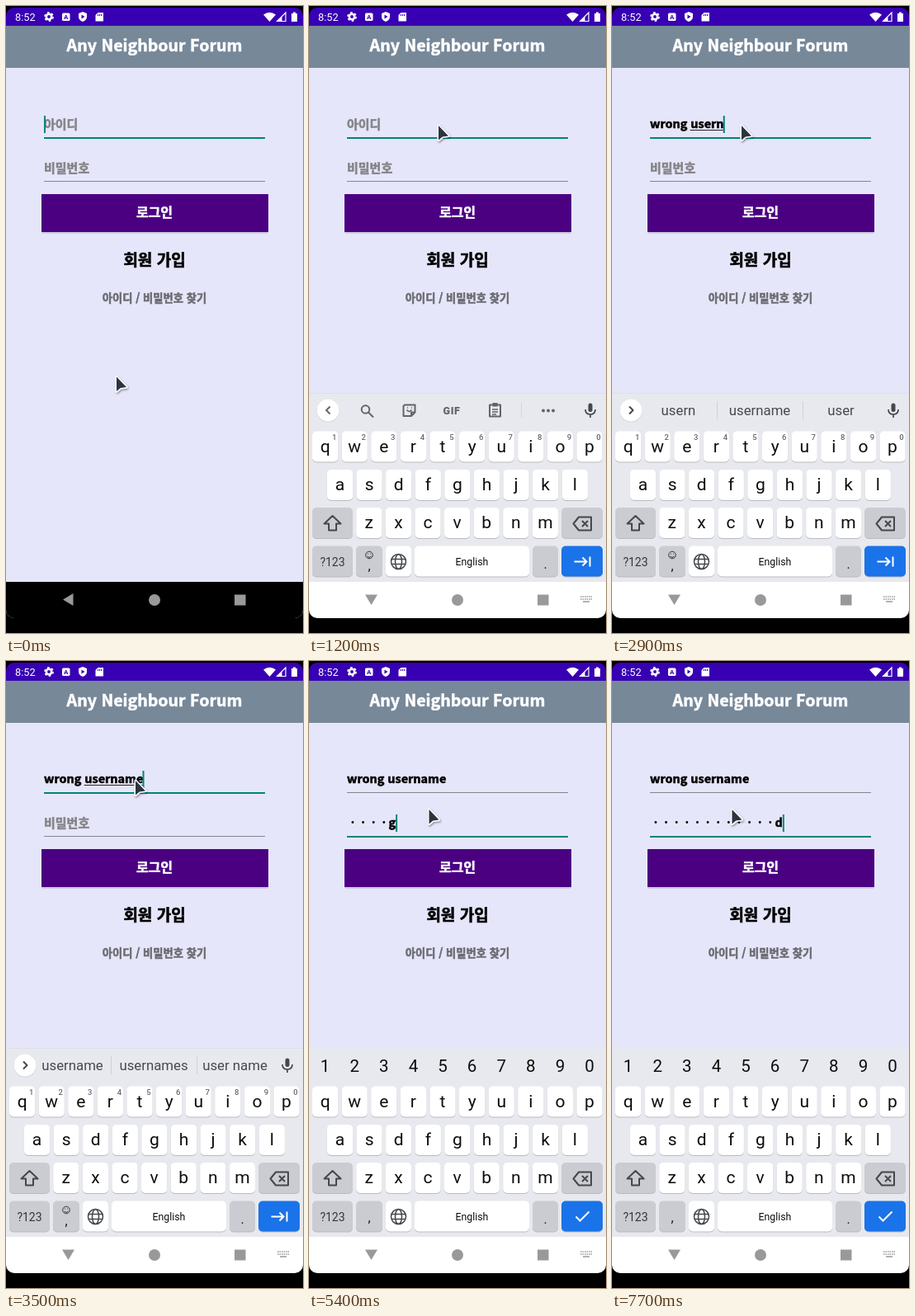
Write an HTML page that moves like this. It is 360 px wide and 760 px high and loops after 8 s.

```html
<!DOCTYPE html>
<html lang="ko">
<head>
<meta charset="utf-8">
<title>Login screen</title>
<style>
html,body{margin:0;width:100%;height:100%;overflow:hidden;background:#000}
svg{display:block;width:360px;height:760px}
.kr{font-family:"Noto Sans CJK KR","Noto Sans CJK",sans-serif;font-weight:900;stroke-width:.55}
.rb{font-family:Roboto,sans-serif}
.mid{text-anchor:middle}
.line{fill:none;stroke:#44474c;stroke-width:2;stroke-linejoin:round}
</style>
</head>
<body>
<svg id="stage" viewBox="0 0 360 760"></svg>
<script>
const LOOP = 8000, STEP = 100;
const FONT = '900 14.4px "Noto Sans CJK KR","Noto Sans CJK",sans-serif';
const stage = document.getElementById('stage');
const $ = id => document.getElementById(id);

const rect = (x, y, w, h, fill, more = '') =>
  `<rect x="${x}" y="${y}" width="${w}" height="${h}" fill="${fill}" ${more}/>`;
const text = (x, y, size, str, fill, cls, more = '') =>
  `<text x="${x}" y="${y}" font-size="${size}" fill="${fill}" class="${cls}" ${more}>${str}</text>`;
const bold = (x, y, size, str, fill, cls = '', more = '') =>
  text(x, y, size, str, fill, 'kr ' + cls, `stroke="${fill}" ${more}`);
const path = (d, more = 'class="line"') => `<path d="${d}" ${more}/>`;
const circle = (x, y, r, more) => `<circle cx="${x}" cy="${y}" r="${r}" ${more}/>`;

function key(x, y, w, fill) {
  return rect(x, y + 1, w, 37, '#b9bbc1', 'rx="5"') + rect(x, y, w, 37, fill, 'rx="5"');
}

function letterRow(str, x0, y) {
  return [...str].map((c, i) => {
    const x = x0 + 35.6 * i;
    return key(x - 15.6, y, 31.2, '#fff') + text(x, y + 25, 21, c, '#0c0d0e', 'rb mid');
  }).join('');
}

function statusBar() {
  const w = 'fill="#fff"';
  return rect(0, 0, 360, 24, '#3700b3') +
    text(11, 18, 12.8, '8:52', '#fff', 'rb') +
    circle(52, 13, 3.2, 'fill="none" stroke="#fff" stroke-width="2.6"') +
    circle(52, 13, 5, 'fill="none" stroke="#fff" stroke-width="1.8" stroke-dasharray="2.6 2.636"') +
    rect(68, 8.5, 9.5, 9.5, '#fff', 'rx="1.5"') +
    text(72.8, 16.2, 8, 'A', '#3700b3', 'rb mid', 'font-weight="700"') +
    path('M93 7l5 2v4q0 4-5 6-5-2-5-6v-4z', w) +
    path('M91.5 10.5l4 2.5-4 2.5z', 'fill="#3700b3"') +
    path('M111.5 8h6.500v10.5h-9.500v-7.500z', w) +
    path('M111.5 10v2m2-2v2m2-2v2', 'stroke="#3700b3" stroke-width="1"') +
    path('M312 10.5q7.5-5.500 15 0l-7.500 8.500z', w) +
    path('M339 8v10.5h-10.5z', 'fill="none" stroke="#fff" stroke-width="1.2"') +
    path('M334.5 13v5.500h-5.500z', w) +
    path('M346 9h2v-1.500h3v1.500h2v10h-7z', w);
}

function form() {
  return rect(0, 24, 360, 675, '#e6e6fa') + rect(0, 24, 360, 51, '#778899') +
    bold(180, 55, 19.6, 'Any Neighbour Forum', '#fff', 'mid') +
    rect(43, 230, 275, 46, '#000', 'opacity=".12" rx="2"') +
    rect(43, 228, 275, 46, '#4b0082') +
    bold(180, 255.5, 16, '로그인', '#fff', 'mid') +
    bold(180, 315, 19, '회원 가입', '#000', 'mid') +
    bold(180, 358.5, 13.3, '아이디 / 비밀번호 찾기', '#6b6b72', 'mid') +
    bold(46, 148.5, 15, '아이디', '#848488', '', 'id="hintId"') +
    bold(46, 201.5, 15, '비밀번호', '#848488', '', 'id="hintPw"') +
    '<rect id="line0" x="46" y="159" width="268"/><rect id="line1" x="46" y="212" width="268"/>' +
    bold(46, 148, 14.4, '', '#000', '', 'id="user"') +
    rect(46, 150, 0, 1, '#222', 'id="compose"') +
    '<g id="dots"></g>' + bold(46, 201, 14.4, '', '#000', '', 'id="last"') +
    rect(46, 133, 2, 21, '#008577', 'id="caret"');
}

const mic = rect(338.5, 481.5, 5, 10.5, '#44474c', 'rx="2.5"') +
  path('M335 489q0 6 6 6t6-6M341 495v4', 'class="line" style="stroke-width:1.7"');

function toolbar() {
  return path('M25.5 485.5l-4.500 4.500 4.500 4.500') +
    circle(68.5, 489, 4.8, 'class="line"') + path('M72 492.5l6 6') +
    path('M116 483.5h12.5v9l-4.500 4.500h-9.500v-12zM128.5 492.5h-4.500v4.500') +
    path('M118.5 489.5q3 4 6 0M119 487h1m4 0h1', 'class="line" style="stroke-width:1.5"') +
    text(173, 494.5, 12.5, 'GIF', '#44474c', 'rb mid', 'font-weight="900" letter-spacing=".6"') +
    path('M219 483.5h13v14h-13z') + rect(222.5, 481, 6, 4.5, '#44474c') +
    path('M222 489h7m-7 3h7m-7 3h5', 'class="line" style="stroke-width:1.3"') +
    rect(257, 481, 1, 18, '#cdd0d5') +
    [284, 290, 296].map(x => circle(x, 490.5, 2, 'fill="#44474c"')).join('');
}

function keyboard() {
  const gray = '#cbccd2', rowX = 19.6;
  const digits = (y, dx, size, fill, more) => [...'1234567890'].map((d, i) =>
    text(rowX + 35.6 * i + dx, y, size, d, fill, 'rb mid', more)).join('');
  return rect(0, 469, 360, 230, '#e8e9ee') + rect(0, 698, 360, 60, '#fff') +
    '<g id="strip">' + rect(0, 469, 360, 1, '#dfe0e6') + circle(23, 490.5, 14, 'fill="#d5d7dc"') +
    circle(23, 490, 13.5, 'fill="#fff"') + mic +
    `<g id="tools" opacity=".82">${toolbar()}</g><g id="words">` + path('M21 485.5l4.500 4.500-4.500 4.500') +
    rect(127, 479, 1, 22, '#cdd0d5') + rect(231, 479, 1, 22, '#cdd0d5') +
    [80.5, 179, 277.5].map((x, i) => text(x, 496, 16.8, '', '#45484d', 'rb mid', `id="word${i}"`)).join('') + '</g></g>' +
    letterRow('qwertyuiop', rowX, 515.5) + letterRow('asdfghjkl', 37.5, 562) + letterRow('zxcvbnm', 72.8, 608) +
    `<g id="small">${digits(526, 11, 9.5, '#666a70', 'font-weight="500"')}</g>` +
    `<g id="big">${digits(498, 0, 20.5, '#0c0d0e', '')}</g>` +
    key(4, 608, 49, gray) + path('M28.5 618l10 9.500h-5.500v8h-9v-8h-5.500z') +
    key(306, 608, 50, gray) + path('M327 619.5h15v16h-15l-6.500-8zM331 624l7 7m0-7l-7 7') +
    key(4, 654.5, 49, gray) + text(28.5, 679, 14, '?123', '#33363a', 'rb mid') +
    key(57, 654.5, 32, gray) + text(73, 684, 16, ',', '#1b1c1e', 'rb mid', 'id="comma"') +
    '<g id="smile">' + circle(73, 665.5, 4.3, 'fill="none" stroke="#333" stroke-width="1"') +
    path('M70.5 667q2.5 3 5 0M71 664h1m2 0h1', 'fill="none" stroke="#333"') + '</g>' +
    key(93, 654.5, 31, '#fff') +
    '<g class="line" style="stroke-width:1.5">' + circle(108.5, 673.5, 9, '') +
    '<ellipse cx="108.5" cy="673.5" rx="4" ry="9"/>' +
    path('M100 670.5h17m-17 6h17', '') + '</g>' +
    key(128, 654.5, 139, '#fff') + text(197.5, 678, 12.3, 'English', '#0c0d0e', 'rb mid') +
    key(271, 654.5, 31, gray) + text(286.5, 682, 16, '.', '#1b1c1e', 'rb mid') +
    key(306, 654.5, 50, '#1a73e8') +
    path('M321.5 673.5h15m-5-5l5 5-5 5M340.5 667.5v12', 'id="tab" fill="none" stroke="#fff" stroke-width="2"') +
    path('M323.5 673.5l5 5 11-11', 'id="check" fill="none" stroke="#fff" stroke-width="2"');
}

function navIcons() {
  const dashed = 'stroke="#999" stroke-width="1.5" stroke-dasharray="1.5 1"';
  return path('M-7.500-6h15l-7.500 12.5z', 'id="back"') + circle(180, 720, 7, '') +
    path('M277 713.5h13.5v13h-13.5z', '') +
    '<g id="kbIcon">' + path('M329 716h14m-14 3h14', dashed) +
    path('M332 722h8', 'stroke="#999" stroke-width="1.5"') + '</g>';
}

stage.innerHTML = `<defs><clipPath id="screen">${rect(0, 2, 360, 740, '#fff', 'rx="10"')}</clipPath>
<filter id="soft" x="-50%" y="-50%" width="200%" height="200%"><feDropShadow dx="1" dy="1.5" stdDeviation="1.3" flood-opacity=".4"/></filter></defs>` +
  rect(0, 0, 360, 760, '#000') + `<g clip-path="url(#screen)">${statusBar()}${form()}` +
  rect(0, 698, 360, 62, '#000') + `<g id="board">${keyboard()}</g>` +
  rect(0, 698, 360, 62, '#000', 'id="shade"') + `<g id="nav">${navIcons()}</g></g>` +
  path('M0 0V17.5L4.800 13.5 12 12.5Z', 'id="mouse" fill="#2b3440" stroke="#fff" stroke-width="3" stroke-linejoin="round" paint-order="stroke" filter="url(#soft)"');

const pen = document.createElement('canvas').getContext('2d');
const width = s => { pen.font = FONT; return pen.measureText(s).width; };
const show = (id, on) => $(id).setAttribute('display', on ? 'inline' : 'none');
const set = (id, o) => { for (const k in o) $(id).setAttribute(k, o[k]); };
const clamp = v => Math.max(0, Math.min(1, v));
const ease = p => p * p * (3 - 2 * p);
const mix = (a, b, p) => a + (b - a) * p;

const USER = 'wrong username', PASS = 'wrongpassword', PITCH = 12.63;
const userTimes = [1300, 1500, 1600, 1800, 1900, 2100, 2400, 2500, 2700, 2800, 2900, 3100, 3200, 3400];
const passTimes = [5000, 5100, 5100, 5300, 5400, 5800, 5900, 6100, 6200, 6300, 6700, 7400, 7600];
const OPEN = 700, SWITCH = 4300;
const guesses = {
  w: 'we what', wr: 'write wrote', wro: 'wrong wrote', wron: 'wrong wrongly', wrong: 'wrongly wring',
  u: 'up us', us: 'use is', use: 'used user', user: 'users used', usern: 'username user',
  userna: 'username user', usernam: 'username usernames', username: 'usernames user_name'
};
const typed = (times, t) => times.filter(at => at <= t).length;

function render(time) {
  const t = Math.floor(time / STEP) * STEP;
  const second = t >= SWITCH;

  const a = ease(clamp((t - 100) / 500)), b = ease(clamp((t - 3700) / 400));
  const mx = mix(mix(134, 157, a), 145.5, b), my = mix(mix(449.5, 145, a), 180, b);
  set('mouse', { transform: `translate(${mx} ${my})` });

  const n = typed(userTimes, t), name = USER.slice(0, n);
  $('user').textContent = name.trim();
  show('hintId', !n);
  const from = n > 6 ? 6 : 0, word = name.slice(from).trim();
  const x0 = 46 + width(USER.slice(0, from));
  set('compose', { x: x0, width: second ? 0 : width(word) });

  const k = typed(passTimes, t), masked = Math.max(0, k - 1);
  show('hintPw', !k);
  $('dots').innerHTML = Array.from({ length: masked }, (_, i) =>
    circle(46 + PITCH * (i + .55), 195.5, 1.4, '')).join('');
  const last = k ? PASS[k - 1] : '';
  $('last').textContent = last;
  set('last', { x: 46 + PITCH * masked });

  for (const i of [0, 1]) {
    const on = second === (i === 1);
    set('line' + i, { height: on ? 2 : 1, fill: on ? '#008577' : '#85858c' });
  }
  const cx = second ? 46 + PITCH * masked + width(last) : 46 + width(name);
  set('caret', { x: cx, y: second ? 186 : 133 });
  const blink = (t >= 1200 && t < 1300) || (t >= 4800 && t < 5000) || (t >= 7100 && t < 7400);
  show('caret', !blink);

  const p = clamp((t - OPEN) / 300);
  set('board', { transform: `translate(0 ${229 * Math.pow(1 - p, 3.15)})` });
  set('shade', { opacity: t <= OPEN ? 1 : t < 900 ? .2 : 0 });
  set('nav', { fill: '#999', opacity: t === 800 ? .6 : 1 });
  const turn = t <= OPEN ? 90 : t < 900 ? 45 : 0;
  set('back', { transform: `translate(75.5 719.5) rotate(${turn})` });
  show('kbIcon', t >= 900);

  show('strip', !second);
  show('tools', !n);
  show('words', n > 0);
  if (n) [word, ...guesses[word].split(' ')].forEach((s, i) => {
    $('word' + i).textContent = s.replace('_', ' ');
  });
  show('small', !second);
  show('big', second);
  show('smile', !second);
  set('comma', { y: second ? 680 : 684 });
  show('tab', !second);
  show('check', second);
}

const start = performance.now();
function tick() {
  render((performance.now() - start) % LOOP);
  requestAnimationFrame(tick);
}
tick();
</script>
</body>
</html>
```
